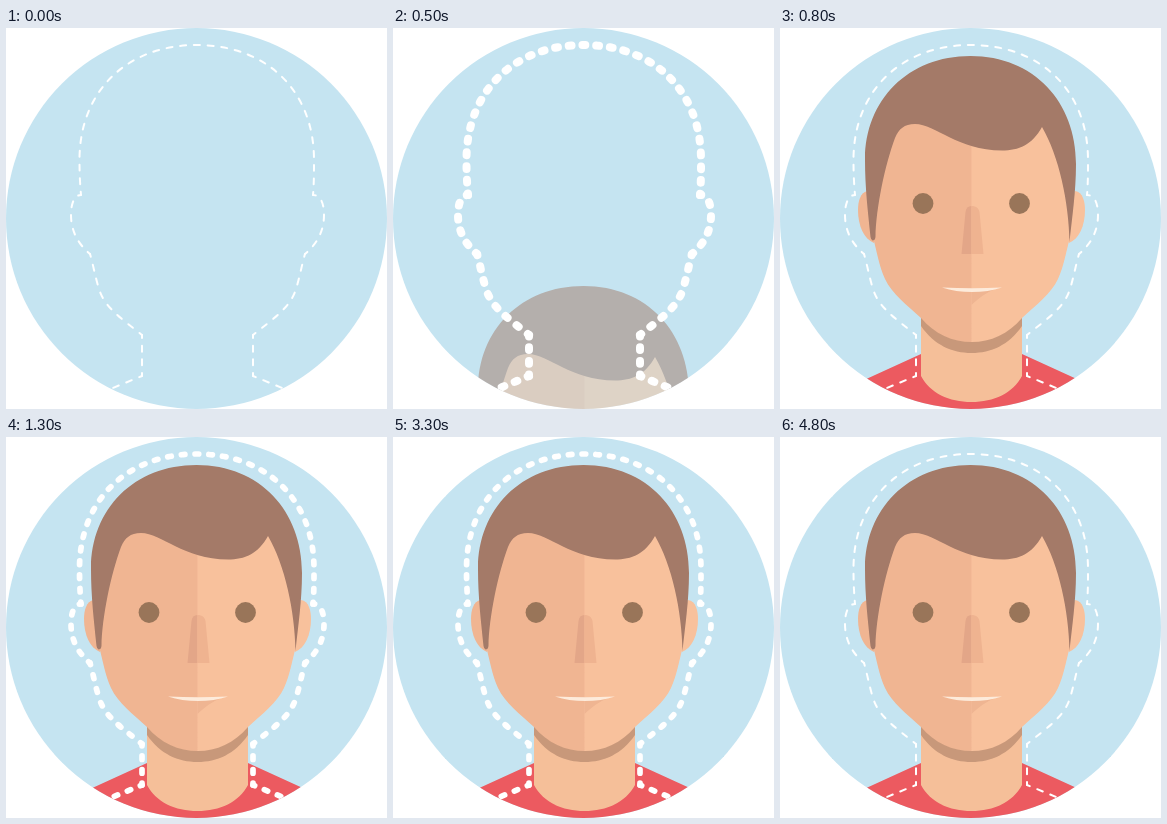
Animation, 381 px wide and 381 px high, one loop 5.3 s. Source, as an HTML page:

```html
<!DOCTYPE html>
<html lang="en">
<head>
<meta charset="utf-8">
<title>Portrait</title>
<style>
  html, body { margin: 0; width: 100%; height: 100%; overflow: hidden; background: #fff; }
  svg { display: block; width: 100%; height: 100%; }
</style>
</head>
<body>
<svg viewBox="0 0 381 381">
  <defs>
    <clipPath id="disc"><circle cx="190.5" cy="190.5" r="190.5"/></clipPath>
  </defs>
  <circle cx="190.5" cy="190.5" r="190.5" fill="#c5e4f1"/>
  <g clip-path="url(#disc)">
    <g id="person">
      <!-- neck and shirt -->
      <path fill="#f5bf99" d="M141 280H242V350Q230 376 191.5 376Q153 376 141 350Z"/>
      <path fill="#c8987a" d="M141 285V298C154 317 172 325 191.5 325C211 325 229 317 242 298V285Z"/>
      <path fill="#ec5a60" d="M141 326L60 363V400H323V363L242 326V348C233 365 214 374 191.5 374C169 374 150 365 141 348Z"/>
      <!-- ears -->
      <path fill="#f0b592" d="M88 163C80 164 78 174 78 182C78 198 84 211 94 215L100 190Z"/>
      <path fill="#f8c19c" d="M295 163C303 164 305 174 305 182C305 198 299 211 289 215L283 190Z"/>
      <!-- face -->
      <path fill="#f0b592" d="M192 60L108 95L92 205C97 224 99 238 105 251C112 266 127 277 141 290C155 306 172 314 192 314Z"/>
      <path fill="#f8c19c" d="M191.5 60L275 95L291 205C286 224 284 238 278 251C271 266 256 277 242 290C228 306 211 314 191.5 314Z"/>
      <path fill="#e3a688" d="M191.5 178C188 178 186 180 185.500 184L181.500 226H191.500Z"/>
      <path fill="#efb390" d="M191.5 178C196 178 198.500 180 199.500 184L203.500 226H191.500Z"/>
      <path fill="#efb592" d="M191.500 262H213Q203 266 191.500 277Z"/>
      <path fill="#fdebdb" d="M162 259.500Q192 261 222 259.500Q208 264 192 264Q176 264 162 259.500Z"/>
      <circle cx="143" cy="175.500" r="10.400" fill="#997559"/>
      <circle cx="239.500" cy="175.500" r="10.400" fill="#997559"/>
      <!-- hair -->
      <path fill="#a47a68" d="M85 132C85 72 128 28 190.500 28C254 28 296 74 296 136C296 164 292 190 289.500 214C289 175 279 128 262 99C252 117 239 122.500 222 122.500C177 122.500 156 96 135 96C124 96 119 101 115 110C105 137 96 180 95.500 209Q95 212.500 92.500 212.500Q91 212 90.500 209C88 184 85 160 85 132Z"/>
    </g>
    <g id="outline" fill="none" stroke="#fff" stroke-linecap="round">
      <path d="M97 364L136 348"/>
      <path d="M136 348V307"/>
      <path d="M136 307C115 290 99 280 93 261C89 248 87 236 84 226"/>
      <path d="M84 226C71 215 65 202 65 187C65 176 68 167 75 167"/>
      <path d="M75 167C74 155 73.500 146 73.500 132C73.500 62 122 17 190.700 17C260 17 308 62 308 132C308 146 308 155 307 167"/>
      <path d="M299 226C312 215 318 202 318 187C318 176 315 167 307 167"/>
      <path d="M247 307C268 290 284 280 290 261C294 248 296 236 299 226"/>
      <path d="M247 348V307"/>
      <path d="M286 364L247 348"/>
    </g>
  </g>
</svg>
<script>
  const LOOP = 5300, ENTER = 800, SPACING = 13.7;
  const THIN = { width: 2, length: 8 };
  const MEDIUM = { width: 5.7, length: 9.3 };
  const THICK = { width: 8, length: 10.8 };

  const person = document.getElementById('person');
  const outline = document.getElementById('outline');
  const parts = [...outline.children].map(path => {
    const total = path.getTotalLength();
    return { path, period: total / Math.round(total / SPACING) };
  });

  // Dashes are centred on both ends of every part, so corners stay solid.
  function setDashes({ width, length }) {
    const dash = length - width;
    outline.setAttribute('stroke-width', width);
    for (const { path, period } of parts) {
      path.setAttribute('stroke-dasharray', `${dash} ${period - dash}`);
      path.setAttribute('stroke-dashoffset', dash / 2);
    }
  }

  function render(t) {
    const entering = t < ENTER;
    const step = Math.floor(entering ? t / 100 : (t - ENTER) / 500);
    const rise = entering ? 730 - step * 100 : 0;
    person.setAttribute('transform', `translate(0 ${rise})`);
    person.setAttribute('opacity', entering ? 0.5 : 1);
    setDashes(step % 2 === 0 ? THIN : entering ? THICK : MEDIUM);
  }

  const start = performance.now();
  function tick() {
    render((performance.now() - start) % LOOP);
    requestAnimationFrame(tick);
  }
  tick();
</script>
</body>
</html>
```
